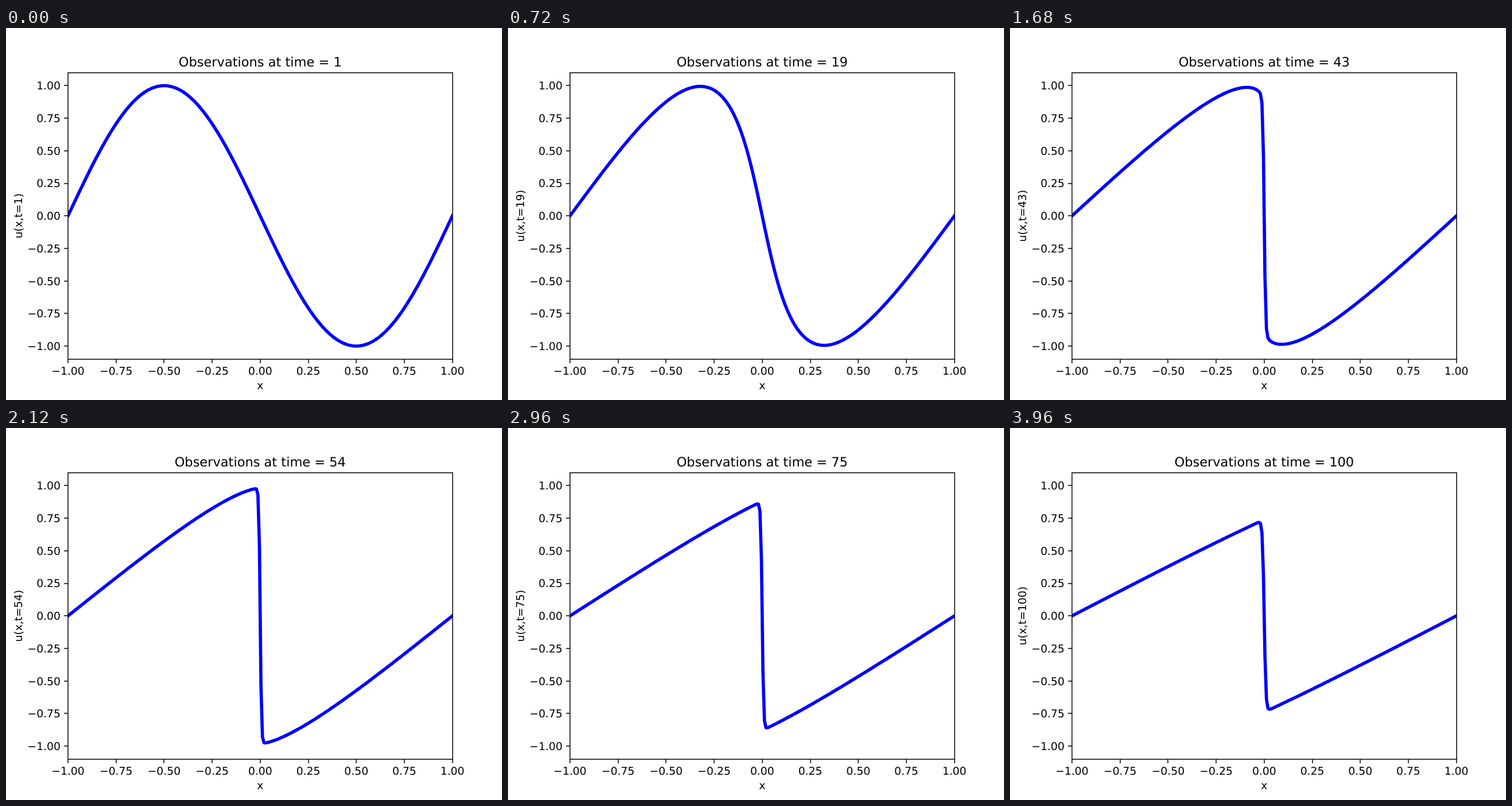
An HTML page for the animation above (4 s loop, 864 px wide and 648 px high).

```html
<!DOCTYPE html>
<html lang="en">
<head>
<meta charset="utf-8">
<title>Observations</title>
<style>
html, body { margin: 0; width: 100%; height: 100%; overflow: hidden; background: #fff; }
svg { display: block; width: 100vw; height: 100vh; }
text { font-family: "DejaVu Sans", sans-serif; font-size: 18.75px; fill: #000; text-rendering: geometricPrecision; }
#title { font-size: 22.5px; }
.axis { fill: none; stroke: #000; stroke-width: 1.5; }
#curve { fill: none; stroke: #00f; stroke-width: 5.625; stroke-linejoin: round; stroke-linecap: square; }
</style>
</head>
<body>
<svg viewBox="0 0 864 648">
  <clipPath id="area"><rect x="108" y="78" width="670" height="499"/></clipPath>
  <g id="ticks"></g>
  <g clip-path="url(#area)"><path id="curve"/></g>
  <rect class="axis" x="108" y="78" width="670" height="499"/>
  <text id="title" x="442.8" y="66.5" text-anchor="middle"></text>
  <text x="442.8" y="629" text-anchor="middle">x</text>
  <text id="ylabel" transform="translate(28 327.24) rotate(-90)" text-anchor="middle"></text>
</svg>
<script>
const STEPS = 100, STEP_MS = 40, POINTS = 256;
const NU = 0.01 / Math.PI;
const $ = id => document.getElementById(id);
const px = x => 442.8 + 334.8 * x;
const py = u => 327.24 - 226.8 * u;

function add(name, attrs, text = "") {
  const el = document.createElementNS("http://www.w3.org/2000/svg", name);
  for (const key in attrs) el.setAttribute(key, attrs[key]);
  el.textContent = text;
  $("ticks").append(el);
}

function drawTicks() {
  for (let i = -4; i <= 4; i++) {
    const v = i / 4;
    const label = (v < 0 ? "\u2212" : "") + Math.abs(v).toFixed(2);
    const x = Math.round(px(v)), y = Math.round(py(v));
    add("path", { class: "axis", d: `M${x} 577v7M108 ${y}h-7` });
    add("text", { x: px(v), y: 603.6, "text-anchor": "middle" }, label);
    add("text", { x: 94.9, y: py(v) + 6.9, "text-anchor": "end" }, label);
  }
}

// Viscous Burgers equation with u(x, 0) = -sin(pi x), solved by Cole-Hopf.
function burgers(x, t) {
  if (t === 0) return -Math.sin(Math.PI * x);
  const width = Math.sqrt(4 * NU * t);
  let top = 0, bottom = 0;
  for (let i = -140; i <= 140; i++) {
    const s = i / 10;
    const a = Math.PI * (x - s * width);
    const w = Math.exp(-s * s - Math.cos(a) / (2 * Math.PI * NU));
    top -= Math.sin(a) * w;
    bottom += w;
  }
  return top / bottom;
}

const paths = [];
function curvePath(step) {
  if (!paths[step]) {
    const left = [], right = [];
    for (let i = 0; i < POINTS / 2; i++) {
      const x = -1 + 2 * i / (POINTS - 1);
      const u = burgers(x, step / 100);
      left.push(px(x).toFixed(3) + " " + py(u).toFixed(3));
      right.unshift(px(-x).toFixed(3) + " " + py(-u).toFixed(3));
    }
    paths[step] = "M" + left.concat(right).join("L");
  }
  return paths[step];
}

let shown = -1;
function render(ms) {
  const step = Math.floor(ms / STEP_MS + 0.01) % STEPS;
  if (step === shown) return;
  shown = step;
  $("curve").setAttribute("d", curvePath(step));
  $("title").textContent = `Observations at time = ${step + 1}`;
  $("ylabel").textContent = `u(x,t=${step + 1})`;
}

function tick() {
  render(performance.now());
  requestAnimationFrame(tick);
}

drawTicks();
render(0);
requestAnimationFrame(tick);
</script>
</body>
</html>
```
